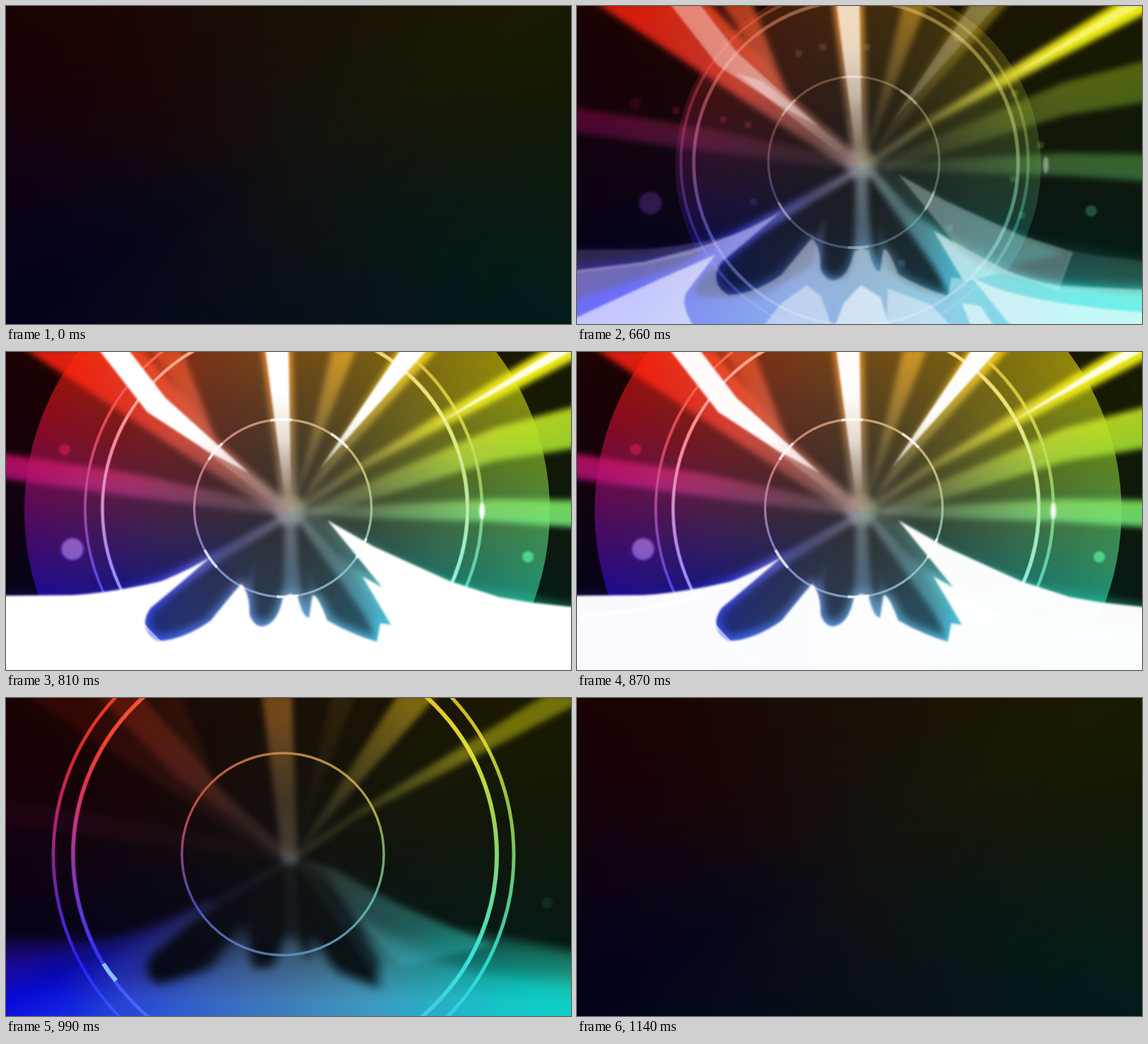
Write an HTML page without scripts that moves like this. It is 800 px wide and 450 px high and loops after 1.65 s.

```html
<!DOCTYPE html>
<html lang="en">
<head>
<meta charset="utf-8">
<title>Spectrum burst</title>
<style>
html, body { margin: 0; width: 100%; height: 100%; overflow: hidden; background: #000; }
.stage { position: relative; width: 800px; height: 450px; overflow: hidden; isolation: isolate; background: #1b1b1b; }
.stage > * { position: absolute; inset: 0; width: 800px; height: 450px; }

/* Grey light below is tinted by this colour wheel */
.hue {
  mix-blend-mode: multiply;
  background:
    radial-gradient(circle at 400px 225px, #a09a94ee 0, #a09a94b8 75px, #a09a9478 150px, #a09a9438 250px, #a09a9400 370px),
    conic-gradient(from 0deg at 400px 225px,
      #ff9000, #f8b800 30deg, #f0ec10 60deg, #a0e030 78deg, #70e878 93deg, #10f0e4 118deg,
      #28b8f8 150deg, #1c8cf4 180deg, #1c60ff 215deg, #2040ff 230deg, #0a0aff 243deg, #4010e0 254deg,
      #8010a0 267deg, #c01070 279deg, #e81030 291deg, #ff2010 302deg, #ff5010 330deg, #ff9000);
}

/* a–e: opacity, r1–r5: radius at the five stages of the burst */
.k { --a: 0; --b: 0; --c: 0; --d: 0; --e: 0; animation: glow 1650ms linear infinite; }
.grow { animation-name: glow, grow; }
.drift { animation-name: glow, drift; }
.disc { --r1: 210px; --r2: 330px; --r3: 372px; --r4: 425px; --r5: 480px; }
.inner { --r1: 118px; --r2: 125.5px; --r3: 125.5px; --r4: 132.5px; --r5: 143px; }
.mid { --r1: 215px; --r2: 251px; --r3: 258.5px; --r4: 284.5px; --r5: 300px; }
.outer { --r1: 230px; --r2: 269px; --r3: 281px; --r4: 309.5px; --r5: 326px; }
.ring { fill: none; stroke: #fff; }

@keyframes glow {
  0%, 34.53% { opacity: 0; }
  34.54%, 36.36% { opacity: var(--a); }
  45.45%, 47.27% { opacity: var(--b); }
  49.09%, 52.72% { opacity: var(--c); }
  56.36%, 59.99% { opacity: var(--d); }
  60%, 61.81% { opacity: var(--e); }
  69.08%, 100% { opacity: 0; }
}
@keyframes grow {
  0%, 36.36% { r: var(--r1); }
  45.45%, 47.27% { r: var(--r2); }
  49.09%, 52.72% { r: var(--r3); }
  56.36%, 59.99% { r: var(--r4); }
  60%, 61.81% { r: var(--r5); }
  69.08%, 100% { r: calc(var(--r5) * 1.08); }
}
@keyframes drift {
  0%, 47.27% { transform: none; }
  49.09%, 52.72% { transform: translateX(var(--x)); }
  56.36%, 100% { transform: translateX(calc(var(--x) * 3.5)); }
}
</style>
</head>
<body>
<div class="stage">
  <svg viewBox="0 0 800 450" fill="#fff">
    <defs>
      <radialGradient id="ray" gradientUnits="userSpaceOnUse" cx="402" cy="228" r="200">
        <stop offset="0" stop-color="#fff" stop-opacity=".75"/>
        <stop offset=".4" stop-color="#fff" stop-opacity=".6"/>
        <stop offset="1" stop-color="#fff"/>
      </radialGradient>
      <radialGradient id="faint" gradientUnits="userSpaceOnUse" cx="402" cy="228" r="280">
        <stop offset="0" stop-color="#fff" stop-opacity=".4"/>
        <stop offset=".35" stop-color="#fff" stop-opacity=".45"/>
        <stop offset="1" stop-color="#fff"/>
      </radialGradient>
      <radialGradient id="core" gradientUnits="userSpaceOnUse" cx="402" cy="228" r="170">
        <stop offset=".1" stop-color="#fff" stop-opacity="0"/>
        <stop offset=".6" stop-color="#fff" stop-opacity=".75"/>
        <stop offset="1" stop-color="#fff"/>
      </radialGradient>
      <radialGradient id="dome">
        <stop offset="0" stop-color="#fff" stop-opacity=".4"/>
        <stop offset=".6" stop-color="#fff" stop-opacity=".8"/>
        <stop offset="1" stop-color="#fff"/>
      </radialGradient>
      <linearGradient id="rise" gradientUnits="userSpaceOnUse" x1="0" y1="325" x2="0" y2="430">
        <stop offset="0" stop-color="#fff" stop-opacity=".2"/>
        <stop offset="1" stop-color="#fff"/>
      </linearGradient>
      <filter id="soft" x="-20%" y="-20%" width="140%" height="140%"><feGaussianBlur stdDeviation="4"/></filter>
      <filter id="crisp" x="-20%" y="-20%" width="140%" height="140%"><feGaussianBlur stdDeviation="1.8"/></filter>
      <filter id="wide" x="-20%" y="-20%" width="140%" height="140%"><feGaussianBlur stdDeviation="7"/></filter>
      <path id="floor" d="M-20 376L95 362L160 345Q230 325 290 290Q250 325 205 362Q185 390 215 409Q250 408 290 380Q318 345 333 328Q345 340 345 372Q352 390 365 388Q385 383 392 348L402 342L413 346Q420 375 429 376L434 345Q440 340 455 380Q490 400 525 410L530 384L545 386L524 350L505 318L545 340L600 370Q640 390 685 396L820 402V470H-20Z"/>
      <path id="leftStrip" d="M-20 345L95 344Q150 341 235 321L160 352L95 366L-20 380Z"/>
      <path id="rightSlope" d="M455 238L520 275L630 325L702 348L682 402L600 378L548 390L524 350L505 318L535 336Z"/>
      <path id="rightEnd" d="M700 347L740 354L820 363V405H678Z"/>
    </defs>

    <circle class="k grow disc" cx="398" cy="225" fill="url(#dome)" style="--a:.045;--b:.46;--c:.56;--d:.14"/>
    <path class="k" fill-rule="evenodd" d="M0 0H800V450H0ZM-27 225a425 425 0 0 0 850 0a425 425 0 0 0-850 0Z" style="--d:.75"/>

    <g filter="url(#soft)" fill="url(#ray)">
      <path class="k" d="M25-5H185L262 75L302 128L415 225L395 238Z" style="--a:.78;--b:.85;--c:.85;--d:.16;--e:.1"/>
      <path class="k" d="M203-5H248L300 130L262 82Z" style="--a:.7;--b:.75;--c:.75;--d:.3;--e:.1"/>
      <path class="k" d="M128-5H195L300 125L405 225L398 232L240 110Z" style="--b:.7;--c:.7;--d:.65;--e:.2"/>
      <path class="k" d="M362-5H405L413 235H392Z" style="--a:.9;--b:.95;--c:.95;--d:.55;--e:.45"/>
      <circle class="k" cx="402" cy="224" r="22" style="--a:.4;--b:.9;--c:.9"/>
    </g>
    <g filter="url(#soft)" fill="url(#faint)">
      <path class="k" d="M462-5H496L428 165L408 220Z" style="--a:.4;--b:.95;--c:.9;--d:.55;--e:.12"/>
      <path class="k" d="M555-5H612L460 165L410 222Z" style="--b:1;--c:1;--d:.45;--e:.48"/>
      <path class="k" d="M765-5H810V8L500 168L405 235L400 226L500 158Z" style="--a:1;--b:1;--c:1;--d:.4;--e:.42"/>
      <path class="k" d="M810 76V135L690 155L440 232L420 224L690 108Z" style="--b:.9;--c:.9;--d:.2"/>
      <path class="k" d="M810 210V248L690 240L420 232V222L690 208Z" style="--b:.9;--c:.9;--d:.2"/>
      <path class="k" d="M-10 143L180 172L395 218V232L160 202L-10 178Z" style="--b:.8;--c:.85;--d:.14;--e:.06"/>
    </g>

    <use class="k" href="#floor" filter="url(#wide)" stroke="#fff" stroke-width="10" style="--b:.95;--c:.95;--d:.5;--e:.2"/>
    <g filter="url(#wide)" fill="url(#rise)">
      <path class="k" d="M-20 343L150 340L290 290L205 362Q185 400 220 405L290 385L333 335L350 385L380 380L402 335L429 375L437 345L470 390L530 412L530 375L450 235L520 275L630 325L820 362V470H-20Z" style="--b:.8;--c:.8;--d:.9;--e:.8"/>
    </g>
    <path class="k" filter="url(#soft)" fill="url(#ray)" d="M-20 421L150 367L195 338L395 228L402 236L255 325L190 372Q155 402 175 412L260 412Q310 382 333 368L352 295L342 370Q365 398 385 380Q396 360 394 230H411Q412 360 433 372L428 305L439 370Q470 405 530 412L505 368L410 235L418 228L470 285L560 360Q660 405 820 405V470H-20Z" style="--a:.95;--b:.8;--c:.8;--d:.3;--e:.12"/>
    <path class="k" filter="url(#soft)" fill="url(#faint)" d="M415 225L460 240L560 295L690 350L560 380L450 260Z" style="--b:.6;--c:.6;--d:.35;--e:.35"/>

    <!-- sparks: zero-length dashes with square caps -->
    <path class="k" fill="none" stroke="#fff" stroke-width="9" stroke-linecap="square" filter="url(#crisp)" d="M314 67h0M348 58h0M410 58h0M538 46h0M620 124h0M656 197h0M618 245h0M630 296h0M528 314h0M460 364h0M250 277h0M242 168h0M207 161h0M140 148h0" style="--a:.42"/>
    <g filter="url(#crisp)">
      <circle class="k drift" cx="104" cy="279" r="17" style="--x:-10px;--b:.65;--c:.75;--d:.25"/>
      <circle class="k drift" cx="728" cy="290" r="8" style="--x:11px;--b:.7;--c:.8;--d:.3;--e:.1"/>
      <circle class="k" cx="83" cy="138" r="8" style="--b:.3;--c:.65"/>
    </g>

    <g class="ring">
      <circle class="k grow inner" cx="392" cy="221" stroke-width="3.5" style="--b:.75;--c:.75;--d:.8;--e:.85"/>
      <circle class="k grow mid" cx="395" cy="222" stroke-width="6" style="--b:.85;--c:.9;--d:1;--e:.95"/>
      <circle class="k grow outer" cx="393" cy="222" stroke-width="5" style="--b:.75;--c:.75;--d:.85;--e:.85"/>
    </g>
  </svg>

  <div class="hue"></div>

  <svg viewBox="0 0 800 450" fill="#fff">
    <g filter="url(#crisp)">
      <use class="k" href="#floor" style="--b:1;--c:1"/>
      <use class="k" href="#leftStrip" style="--b:.35;--c:1"/>
      <use class="k" href="#rightSlope" style="--b:.72;--c:1"/>
      <use class="k" href="#rightEnd" style="--b:.25;--c:1"/>

      <path class="k" d="M196 352L120 385L-10 445V460H170Q145 425 155 405ZM402 395L378 420L364 455H442L430 412ZM558 383Q620 420 810 434V460H620ZM545 420L558 455H592L572 425Z" style="--a:1"/>
      <path class="k" d="M325 395L290 420L262 455H362L345 410ZM440 400L438 455H532L500 422Z" style="--a:.72"/>

      <g fill="url(#core)">
        <path class="k" d="M130-5H172L226 65L345 172L285 140L200 85Z" style="--b:1;--c:1"/>
        <path class="k" d="M225 95L262 106L405 222L398 230Z" style="--a:.4;--b:.25;--c:.25"/>
        <path class="k" d="M367-5H400L404 215L396 215Z" style="--a:.48;--b:1;--c:1"/>
        <path class="k" d="M560-5H598L445 165Z" style="--b:.5;--c:1"/>
      </g>
      <path class="k" d="M775-2L808-5L610 102Z" style="--b:.95;--c:.9"/>
      <ellipse class="k drift" cx="664" cy="225" rx="4" ry="12" style="--x:10px;--b:.95;--c:.95"/>
      <circle class="k drift" cx="104" cy="279" r="15" style="--x:-10px;--b:.15;--c:.28"/>
    </g>

    <g filter="url(#soft)">
      <path class="k" d="M205 348L100 392L-10 428V460H165L145 405ZM325 372L300 402L260 460H362L340 398ZM440 384L436 460H508L472 408ZM556 372L620 408L690 428L810 442V460H625Z" style="--d:.95"/>
      <path class="k" d="M402 400L368 460H442Z" style="--d:.65"/>
      <path class="k" d="M-10 425L180 372L165 460H-10ZM160 400L260 420L325 360L402 390L440 370L560 400L600 460H160Z" style="--d:.15"/>
    </g>

    <g class="ring">
      <circle class="k grow inner" cx="392" cy="221" stroke-width="3" style="--b:.25;--c:.25;--d:.1"/>
      <circle class="k grow inner" cx="392" cy="221" stroke-width="4" pathLength="360" stroke-dasharray="0 20 14 46 14 44 14 61 14 35 14 27 14 43" style="--b:.7;--c:.7"/>
      <circle class="k grow mid" cx="395" cy="222" stroke-width="4" style="--b:.5;--c:.5;--d:.35;--e:.12"/>
      <circle class="k grow outer" cx="393" cy="222" stroke-width="3" style="--b:.2;--c:.2;--d:.15;--e:.08"/>
      <path class="k" d="M138 376Q146 389 156 400" stroke="#9df" stroke-width="6" style="--e:.85"/>
    </g>
  </svg>
</div>
</body>
</html>
```
